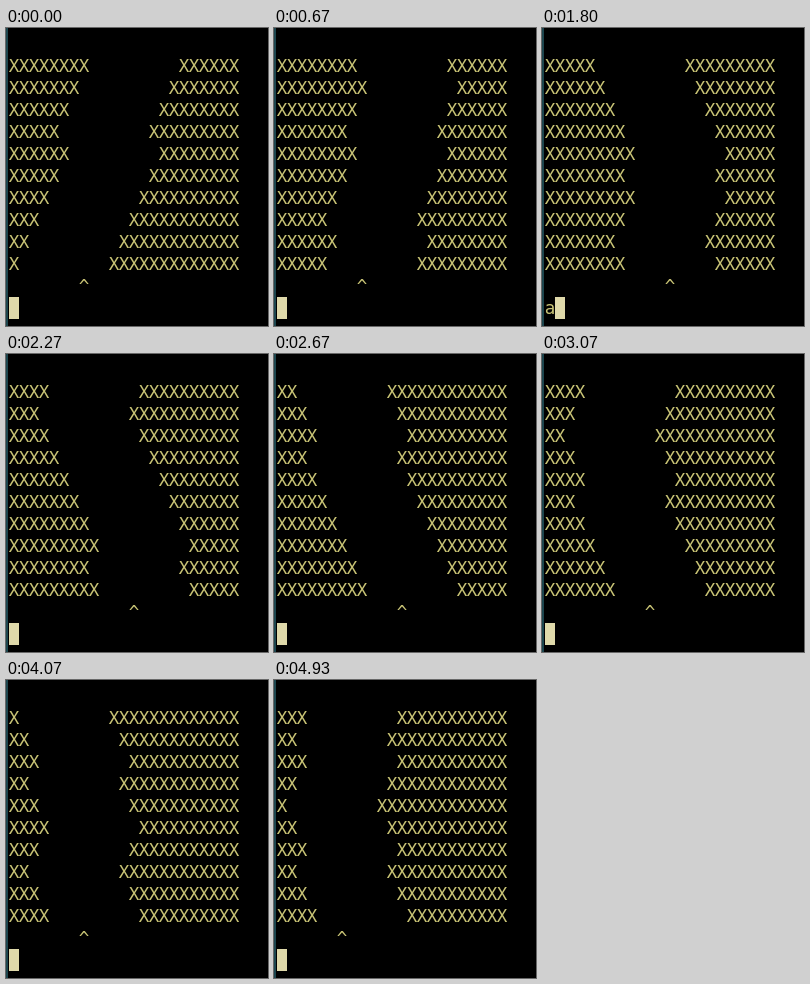
Animation of 262 by 298 pixels, one loop 4990 ms. Source, as an HTML page with a canvas:

```html
<!DOCTYPE html>
<html lang="en">
<head>
<meta charset="utf-8">
<title>Terminal road game</title>
<style>
html, body { margin: 0; width: 100%; height: 100%; overflow: hidden; background: #000; }
canvas { display: block; }
</style>
</head>
<body>
<canvas id="stage" width="262" height="298"></canvas>
<script>
const ctx = document.getElementById('stage').getContext('2d');
const LOOP = 4990, TICK = 200, LEAD = 130;
const ROWS = 10, COLS = 23, GAP = 9;
const CELL_W = 10, CELL_H = 22, LEFT = 3, TOP = 27;

// Left wall width of each road row, in order of arrival at the bottom
const road = [...'12345656787898987654343234323212323'].map(Number);
// Key pressed during each tick; the player moves on the next one
const keys = '...ddddd.a.d..aaaaaad.a...';

function put(text, col, row) {
  [...text].forEach((ch, i) =>
    ctx.fillText(ch, LEFT + (col + i + 0.5) * CELL_W, TOP + row * CELL_H + 17));
}

function playerAt(tick) {
  let col = 7;
  for (const key of keys.slice(0, tick)) col += key === 'd' ? 1 : key === 'a' ? -1 : 0;
  return col;
}

function draw(time) {
  const t = time % LOOP + LEAD;
  const tick = Math.floor(t / TICK);
  ctx.fillStyle = '#000';
  ctx.fillRect(0, 0, 262, 298);
  ctx.fillStyle = '#1d464e';
  ctx.fillRect(0, 0, 2, 298);

  ctx.font = '17.5px "DejaVu Sans Mono", "Noto Sans Mono", monospace';
  ctx.textAlign = 'center';
  ctx.fillStyle = '#c8c375';
  for (let row = 0; row < ROWS; row++) {
    const wall = road[tick + ROWS - 1 - row];
    put('X'.repeat(wall), 0, row);
    put('X'.repeat(COLS - GAP - wall), wall + GAP, row);
  }
  put('^', playerAt(tick), ROWS);

  const typed = t % TICK >= 60 && keys[tick] !== '.' ? keys[tick] : '';
  put(typed, 0, ROWS + 1);
  ctx.fillStyle = '#dfd9aa';
  ctx.fillRect(LEFT + typed.length * CELL_W, TOP + (ROWS + 1) * CELL_H, CELL_W, CELL_H);
}

const start = performance.now();
function frame() {
  draw(performance.now() - start);
  requestAnimationFrame(frame);
}
frame();
</script>
</body>
</html>
```
